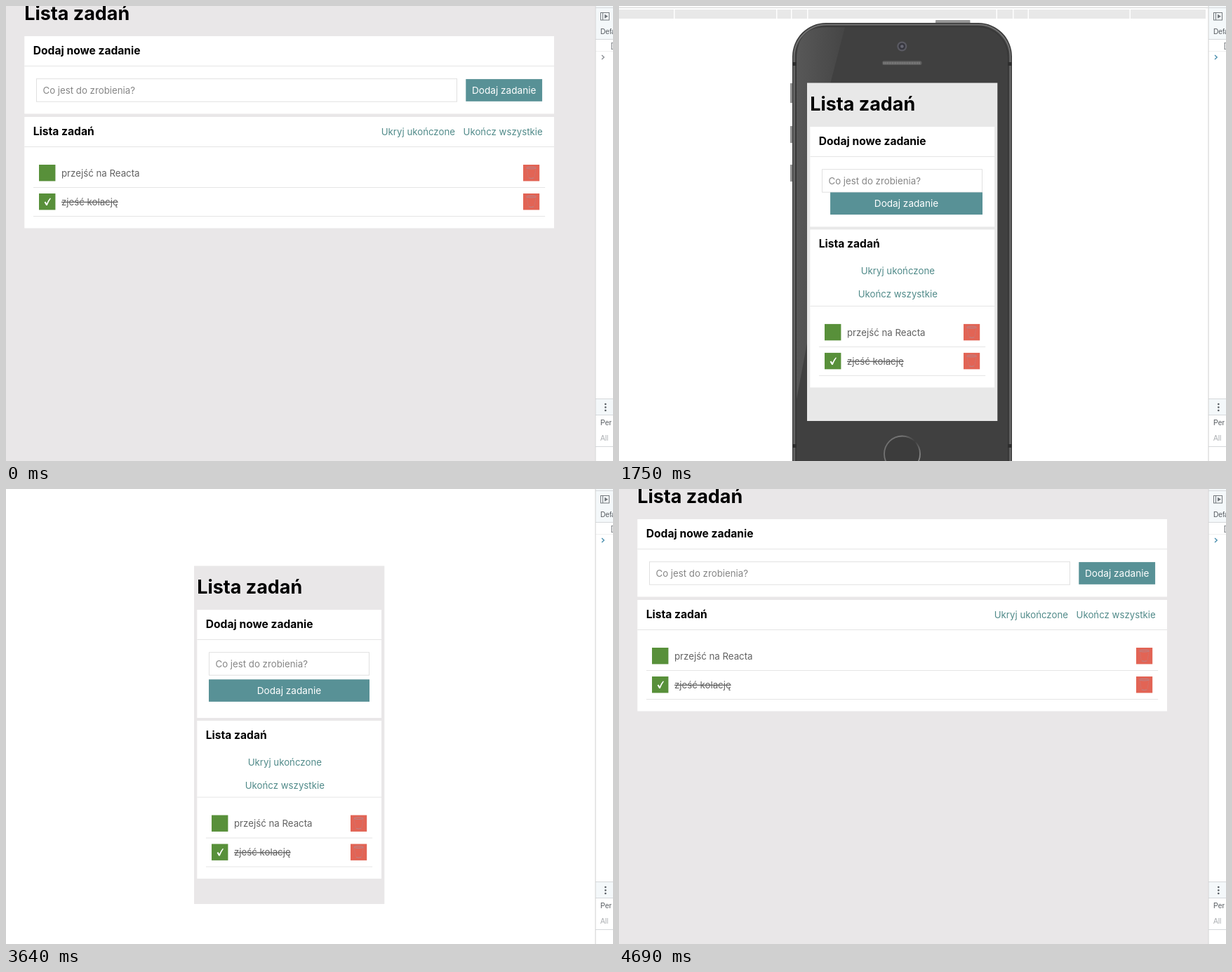
Animation, 865 px wide and 648 px high, one loop 4.83 s. Source, as an HTML page:

```html
<!DOCTYPE html>
<html lang="pl">
<head>
<meta charset="utf-8">
<title>Lista zadań</title>
<style>
  @property --m { syntax: "<number>"; inherits: true; initial-value: 1; }

  html, body { margin: 0; width: 100%; height: 100%; overflow: hidden; background: #fff; }
  svg { display: block; width: 865px; height: 648px; font: 13.25px Inter, "Open Sans", sans-serif; }
  svg, .desk, .device, .frame, .strip, .prompt { animation: 4830ms infinite step-end; }

  /* --m is the share of the wide button margin: 1 on desktop, 0 on the phone */
  svg { animation-name: margin; animation-timing-function: ease; }
  .desk { animation-name: desk; --g: calc(1px * max(0, 10 - 12 * var(--m))); }
  .device { animation-name: device; }
  .frame { animation-name: frame; }
  .strip { animation-name: strip; }
  .prompt { animation-name: prompt; }

  @keyframes margin {
    0%, 35.197% { --m: 1; }
    55.901%, 75.776% { --m: 0; }
    96.48%, 100% { --m: 1; }
  }
  @keyframes desk { 0% { opacity: 1; } 36.2% { opacity: 0; } 76.8%, 100% { opacity: 1; } }
  @keyframes device { 0% { opacity: 0; } 36.2% { opacity: 1; } 76.8%, 100% { opacity: 0; } }
  @keyframes frame { 0% { opacity: 1; } 72.45%, 100% { opacity: 0; } }
  @keyframes strip { 0% { opacity: 0; } 76.8% { opacity: 1; } 97.09%, 100% { opacity: 0; } }
  @keyframes prompt { 0% { stroke: #8b8f94; } 1.44%, 100% { stroke: #4a8fae; } }

  .h1 { font-size: 26.9px; font-weight: 700; }
  .h2 { font-size: 15.6px; font-weight: 700; }
  .page { fill: #e9e7e8; }
  .card { fill: #fff; }
  .rule { fill: #e5e5e5; }
  .field { fill: #fff; stroke: #e0e0e0; }
  .hint { fill: #858585; }
  .item { fill: #626262; }
  .done { text-decoration: line-through; }
  .button { fill: #589196; }
  .label { fill: #fff; font-size: 13.6px; text-anchor: middle; }
  .link { fill: #508a89; }
  .mid { text-anchor: middle; }
  .tools { font: 10.2px "Liberation Sans", Arial, sans-serif; }

  .desk .top { height: calc(110.5px + var(--g)); }
  .desk .form { transform: translateY(calc(var(--g) / 2)); }
  .desk .field { width: calc(611.5px - 12.5px * var(--m)); }
  .desk .list { transform: translateY(calc(158px + var(--g))); }

  .device .top { height: calc(154px - 12px * var(--m)); }
  .device .button { x: calc(43px + 12.5px * var(--m)); width: calc(229px - 12.5px * var(--m)); }
  .device .submit { transform: translateY(calc(-6px * var(--m))); }
  .device .label { transform: translateX(calc(6.25px * var(--m))); }
  .device .list { transform: translateY(calc(201px - 12px * var(--m))); }
</style>
</head>
<body>
<svg id="stage" viewBox="0 0 865 648" xmlns="http://www.w3.org/2000/svg"></svg>
<script>
const rect = (x, y, w, h, attrs = '') =>
  `<rect x="${x}" y="${y}" width="${w}" height="${h}" ${attrs}/>`;
const text = (x, y, cls, str) => `<text x="${x}" y="${y}" class="${cls}">${str}</text>`;
const fill = color => `fill="${color}"`;

const tick = `<path fill="#fff"
  d="M54.6 12.6 56.4 11.6 58 14.2Q60 9.6 62.8 6.6L64 7Q60.8 11.5 58.7 17H57.2Z"/>`;

const bin = x => `
  <g transform="translate(${x} 0)">
    ${rect(0, 0, 23.2, 23.4, fill('#e26455'))}
    <g fill="none" stroke="#ac8f9a" stroke-width=".8">
      <ellipse cx="11.6" cy="4.6" rx="6.8" ry="1.3"/>
      <path d="M5 5.5 7.4 18.5M18.2 5.5 15.8 18.5" opacity=".55" stroke-dasharray="1.5 1"/>
      <path d="M8 18.8q3.6 1.4 7.2 0"/>
    </g>
  </g>`;

const row = (y, w, str, done) => `
  <g transform="translate(0 ${y})">
    ${rect(47, 0, 23.4, 23.4, fill('#58903a'))}
    ${done ? tick : ''}
    ${text(79, 16.7, done ? 'item done' : 'item', str)}
    ${bin(w - 17.7)}
    ${rect(39, 32, w - 25.5, 1, 'class="rule"')}
  </g>`;

// w is the card width, head the height of the list header
const app = (w, head, form, links) => `
  ${text(26.3, 20.4, 'h1', 'Lista zadań')}
  ${rect(26.3, 43, w, 110.5, 'class="card top"')}
  ${text(38.8, 69, 'h2', 'Dodaj nowe zadanie')}
  ${rect(26.3, 85, w, 1, 'class="rule"')}
  <g class="form">${form}</g>
  <g class="list">
    ${rect(26.3, 0, w, head + 116.4, 'class="card"')}
    ${text(38.8, 25.7, 'h2', 'Lista zadań')}
    ${links}
    ${rect(26.3, head, w, 1, 'class="rule"')}
    ${row(head + 26, w, 'przejść na Reacta', false)}
    ${row(head + 67, w, 'zjeść kolację', true)}
  </g>`;

const form = (fieldW, buttonX, buttonY, buttonW) => `
  ${rect(43.5, 103.7, fieldW, 32.5, 'class="field"')}
  ${text(52.5, 124.9, 'hint', 'Co jest do zrobienia?')}
  <g class="submit">
    ${rect(buttonX, buttonY, buttonW, 31.7, 'class="button"')}
    ${text(buttonX + buttonW / 2, buttonY + 20.7, 'label', 'Dodaj zadanie')}
  </g>`;

const desk = `
  <g class="desk">
    ${rect(0, 0, 840, 648, 'class="page"')}
    ${app(754.7, 42, form(599, 655.3, 104.1, 108.8),
      text(534.7, 26.4, 'link', 'Ukryj ukończone') + text(651.6, 26.4, 'link', 'Ukończ wszystkie'))}
    <g class="strip">${rect(743, 0, 97, 1.7, fill('#fff'))}</g>
  </g>`;

const ruler = [0, 79.5, 225.5, 246.5, 269.5, 539, 562.5, 584, 729, 837.5]
  .map((x, i, a) => i < 9 ? rect(x, 5, a[i + 1] - x - 1.5, 13, fill('#e8e8e8')) : '').join('');

const sideKeys = [[110, 28], [171, 24], [226, 24]]
  .map(([y, h]) => rect(244, y, 5, h, fill('#929292'))).join('');

const bands = [80, 624]
  .map(y => rect(247, y, 6, 5, fill('#2e2e2e')) + rect(554, y, 6, 5, fill('#2e2e2e'))).join('');

const phone = `
  <g class="frame">
    ${rect(0, 2, 840, 1, fill('#d4d4d4'))}
    ${ruler}
    ${rect(451, 20, 49.5, 8, 'rx="1" fill="#979797"')}
    ${sideKeys}
    ${rect(247, 24, 313, 700, 'rx="48" fill="#383838"')}
    ${rect(249.5, 26.5, 308, 695, 'rx="46" fill="#404040" stroke="#707070" stroke-width="2"')}
    ${rect(252.5, 29.5, 302, 690, 'rx="43" fill="#404040" stroke="#343434"')}
    <path d="M253 76Q253 30 296 30H322L268 238V480L253 560Z" fill="url(#gloss)"/>
    ${bands}
    <circle cx="403.3" cy="57.5" r="7" fill="#5b5b63"/>
    <circle cx="403.3" cy="57.5" r="4.8" fill="#37373f"/>
    <circle cx="403.3" cy="57.5" r="2.3" fill="#686874"/>
    ${rect(375, 78.3, 56.5, 5.6, 'rx="2.5" fill="#5c5c5c"')}
    <path d="M377 81.2H430" stroke="#8b8b8b" stroke-width="3" stroke-dasharray="1.2 1.2"/>
    <circle cx="403.5" cy="638" r="25.5" fill="#3c3c3c" stroke="url(#ring)" stroke-width="1.8"/>
    ${rect(268, 109.5, 271.3, 481.5, fill('#e8e8e8'))}
  </g>`;

const device = `
  <g class="device">
    ${rect(0, 0, 840, 648, fill('#fff'))}
    ${rect(268, 109.5, 271.3, 481.5, 'class="page"')}
    ${phone}
    <g transform="translate(246 129)">
      ${app(262.7, 108.5, form(228, 43, 142.2, 229),
        text(151.3, 63.6, 'link mid', 'Ukryj ukończone') + text(151.3, 96.8, 'link mid', 'Ukończ wszystkie'))}
    </g>
  </g>`;

const hline = y => rect(840, y, 25, 1, fill('#d5d8db'));
const panel = `
  <g class="tools">
    ${rect(839.5, 0, 26, 648, fill('#fff'))}
    ${rect(840, 0, 25, 48, fill('#f4f8fa'))}
    ${rect(840, 559, 25, 23, fill('#f4f8fa'))}
    ${[2, 47, 559, 582, 627].map(hline).join('')}
    ${rect(840, 64, 25, 1, fill('#f0f0f0'))}
    ${rect(847.5, 9.5, 12, 10.5, 'fill="none" stroke="#73787d"')}
    <path d="M850.5 9.5V20" stroke="#73787d"/>
    <path d="M853 11.8 858 14.8 853 17.8Z" fill="#73787d"/>
    <g fill="#565b60">
      ${text(847, 40, '', 'Default')}
      ${text(862, 60, '', '[')}
      ${text(847, 597, '', 'Per')}
      ${[567, 571.5, 576].map(y => `<circle cx="854.3" cy="${y}" r="1.3"/>`).join('')}
    </g>
    <g fill="#adb0b3">${text(847, 619, '', 'All')}</g>
    <path class="prompt" d="M849 70 852.2 73 849 76" fill="none" stroke-width="1.4"/>
    ${rect(839.5, 0, 1, 648, fill('#cfcfcf'))}
  </g>`;

document.getElementById('stage').innerHTML = `
  <defs>
    <linearGradient id="gloss" x1="0" y1="0" x2="1" y2=".15">
      <stop offset="0" stop-color="#585858"/>
      <stop offset="1" stop-color="#454545"/>
    </linearGradient>
    <linearGradient id="ring" x1="0" y1="0" x2="1" y2=".6">
      <stop offset="0" stop-color="#6a6a6a"/>
      <stop offset=".35" stop-color="#777"/>
      <stop offset=".7" stop-color="#3e3e3e"/>
      <stop offset="1" stop-color="#8a8a8a"/>
    </linearGradient>
  </defs>
  ${desk}${device}${panel}`;
</script>
</body>
</html>
```
